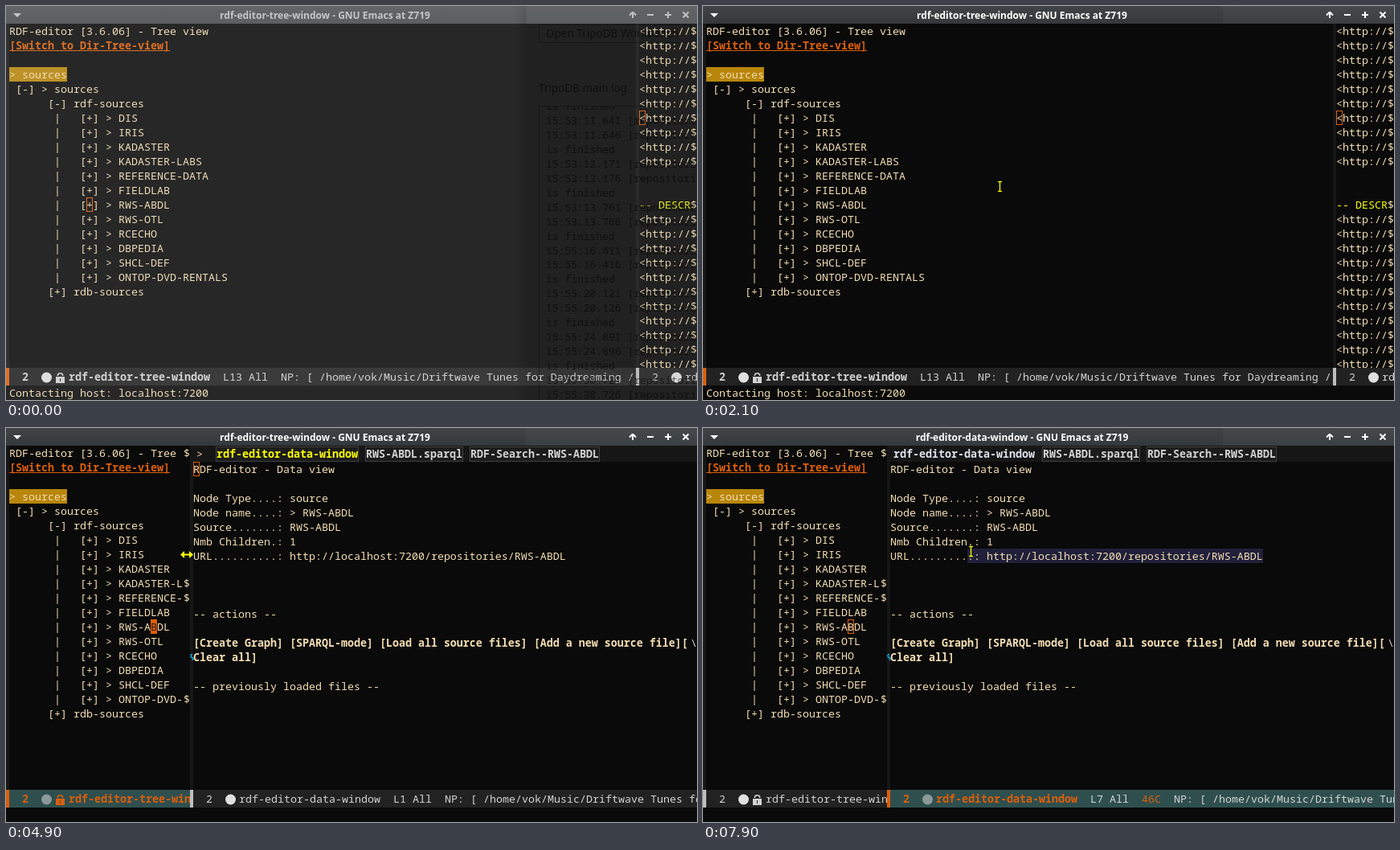
An HTML page with a canvas that plays this animation: 860 by 490 pixels, repeating every 8000 ms.

```html
<!DOCTYPE html>
<html lang="en">
<head>
<meta charset="utf-8">
<title>RDF editor</title>
<style>
html, body { margin: 0; width: 100%; height: 100%; overflow: hidden; background: #0a0a0a; }
canvas { display: block; }
</style>
</head>
<body>
<canvas width="860" height="490"></canvas>
<script>
const W = 860, H = 490, LOOP = 8000, STEP = 100, CW = 8, RH = 18, TOP = 22, MODE_Y = 450;
const BG = '#0a0a0a', FG = '#f5deb3', ORANGE = '#dd5f0a', YELLOW = '#ffff00', GRAY = '#d3d3d3',
      FRINGE = '#161616', TEAL = '#2f4f4f', DIM = '#222222';
const MONO = '13.333px "Noto Sans Mono", monospace';
const CLICK = 1300, LOADED = 3100, SELECT = 6600, URL_ROW = 6;
const c = document.querySelector('canvas').getContext('2d');

const leaves = ['DIS', 'IRIS', 'KADASTER', 'KADASTER-LABS', 'REFERENCE-DATA', 'FIELDLAB', 'RWS-ABDL',
  'RWS-OTL', 'RCECHO', 'DBPEDIA', 'SHCL-DEF', 'ONTOP-DVD-RENTALS'];
const tree = ['RDF-editor [3.6.06] - Tree view', '[Switch to Dir-Tree-view]', '', '> sources',
  ' [-] > sources', '      [-] rdf-sources', ...leaves.map(s => '       |   [+] > ' + s),
  '      [+] rdb-sources'];
const data = ['RDF-editor - Data view', '', 'Node Type....: source', 'Node name....: > RWS-ABDL',
  'Source.......: RWS-ABDL', 'Nmb Children.: 1',
  'URL..........: http://localhost:7200/repositories/RWS-ABDL', '', '', '', '-- actions --', '',
  '[Create Graph] [SPARQL-mode] [Load all source files] [Add a new source file][Clear all]', '',
  '-- previously loaded files --'];
const tabs = ['rdf-editor-data-window', 'RWS-ABDL.sparql', 'RDF-Search--RWS-ABDL'];
const playing = 'NP: [ /home/vok/Music/Driftwave Tunes for Daydreaming /';

// Strokes of movement; a positive power eases in, a negative one eases out
const mouse = { start: [120, 47], moves: [
  { from: 200, to: 800, p: 1, pos: [183, 246] },
  { from: CLICK, to: 2000, p: 1, pos: [235, 235] },
  { from: 2000, to: 2600, p: -1.5, pos: [793, 191] },
  { from: 3200, to: 3500, p: 2.5, pos: [430, 157] },
  { from: 3600, to: 4200, p: -1.5, pos: [279, 157] },
  { from: 4500, to: 4900, p: -1.3, pos: [225, 157] },
  { from: 5500, to: 6000, p: 1.3, pos: [806, 158] },
  { from: 6000, to: 6300, p: -1.3, pos: [702, 157] },
  { from: SELECT, to: 7300, p: -1.25, pos: [333, 153] }] };
const divider = { start: [788], moves: [
  { from: 3200, to: 3500, p: 1.7, pos: [672] },
  { from: 3600, to: 4200, p: -1.7, pos: [287] },
  { from: 4500, to: 4900, p: -1.3, pos: [233] }] };

const ease = (u, p) => p > 0 ? u ** p : 1 - (1 - u) ** -p;

function place(track, t) {
  let pos = track.start;
  for (const m of track.moves) {
    if (t <= m.from) break;
    const k = ease(Math.min(1, (t - m.from) / (m.to - m.from)), m.p);
    pos = pos.map((v, i) => v + (m.pos[i] - v) * k);
  }
  return pos.map(Math.round);
}

function box(x, y, w, h, color) {
  c.fillStyle = color;
  c.fillRect(x, y, w, h);
}

function frame(x, y, w, h, color) {
  c.strokeStyle = color;
  c.lineWidth = 1;
  c.strokeRect(x + .5, y + .5, w - 1, h - 1);
}

// y is the top of an 18 px text row
function text(s, x, y, color = FG, bold = false) {
  c.font = (bold ? 'bold ' : '') + MONO;
  c.fillStyle = color;
  c.fillText(s, x, y + 14);
}

function cut(s, x, end, y, color, bold) {
  const cols = Math.floor((end - x) / CW);
  if (s.length <= cols) return text(s, x, y, color, bold);
  text(s.slice(0, cols - 1), x, y, color, bold);
  text('$', end - CW, y);
}

function clipped(x, y, w, h, draw) {
  c.save();
  c.beginPath();
  c.rect(x, y, w, h);
  c.clip();
  draw();
  c.restore();
}

function triangle(x1, y1, x2, y2, x3, y3) {
  c.beginPath();
  c.moveTo(x1, y1);
  c.lineTo(x2, y2);
  c.lineTo(x3, y3);
  c.fill();
}

// Short stroke centred on x, y
function bar(x, y, dx, dy, width = 2) {
  c.lineWidth = width;
  c.beginPath();
  c.moveTo(x - dx, y - dy);
  c.lineTo(x + dx, y + dy);
  c.stroke();
}

function cursor(x, y, solid, ch) {
  if (!solid) return frame(x, y, CW, RH, ORANGE);
  box(x, y, CW, RH, ORANGE);
  text(ch, x, y, '#33190a');
}

function titleBar(s, focused) {
  const g = c.createLinearGradient(0, 0, 0, TOP);
  g.addColorStop(0, focused ? '#404447' : '#505354');
  g.addColorStop(1, focused ? '#34393c' : '#484b4c');
  box(0, 0, W, TOP, g);
  box(647, 0, W - 647, TOP, 'rgba(255,255,255,.03)');
  c.fillStyle = c.strokeStyle = focused ? '#ffffff' : '#c4c4c4';
  c.font = 'bold 12px "Noto Sans", sans-serif';
  c.textAlign = 'center';
  c.fillText(s + ' - GNU Emacs at Z719', 397, 16);
  c.textAlign = 'left';
  triangle(9, 9, 19, 9, 14, 14);
  bar(780, 11.5, 0, 3.5);
  bar(778, 9.5, 2, -2);
  bar(782, 9.5, 2, 2);
  bar(802, 11, 4, 0);
  bar(824, 11, 4, 0);
  bar(824, 11, 0, 4);
  bar(846, 11, 3.5, 3.5);
  bar(846, 11, 3.5, -3.5);
}

function lock(x, color, hole) {
  box(x, 461, 11, 8, color);
  box(x + 5, 463, 1, 4, hole);
  c.beginPath();
  c.arc(x + 5.5, 460, 3.2, Math.PI, 0);
  c.strokeStyle = color;
  c.lineWidth = 1.6;
  c.stroke();
}

function modeLine(x, end, { name, pos, sel, locked, active, lit }) {
  clipped(x - 4, MODE_Y, end - x + 4, 22, () => {
    const y = MODE_Y + 2, ink = lit ? ORANGE : GRAY, bg = lit ? TEAL : DIM;
    box(x - 4, MODE_Y, end - x + 4, 22, bg);
    box(x - 4, MODE_Y, 4, 22, active ? ORANGE : '#bebebe');
    text('2', x + 16, y, ink, active);
    c.beginPath();
    c.arc(x + 46.5, 462, 6.5, 0, 7);
    c.fillStyle = lit ? '#8c9999' : '#e0e0e0';
    c.fill();
    if (locked) lock(x + 58, ink, bg);
    let at = x + (locked ? 74 : 57);
    const part = (s, color, bold) => {
      if (!s) return;
      text(s, at, y, color, bold);
      at += s.length * CW + 16;
    };
    part(name, ink, active);
    part(pos, GRAY);
    part(sel, ORANGE);
    part(playing, GRAY);
  });
}

// Row and extent of the link under the pointer
function linkAt(t, x, y) {
  const row = Math.floor((y - TOP) / RH), leaf = row > 5 && row < 18;
  if (t < 300 || !leaf && row !== 1) return null;
  const from = leaf ? 124 : 4, to = 4 + tree[row].length * CW;
  return x >= from && x < to && t < 2600 ? { row, from, to } : null;
}

function treeView(t, end, link) {
  clipped(0, TOP, end, MODE_Y - TOP, () => {
    box(0, TOP, 4, MODE_Y, FRINGE);
    box(4, TOP + 3 * RH, 72, RH, '#b8860b');
    if (link) box(link.from, TOP + link.row * RH, link.to - link.from, RH, '#c1ffc1');
    tree.forEach((s, i) => cut(s, 4, end, TOP + i * RH, i === 1 ? ORANGE : FG, i === 1));
    box(4, 55, 200, 1, ORANGE);
    const blink = t >= 2100 && t < 2600 || t >= 5400 && t < 5900;
    if (t < CLICK) cursor(100, 238, false);
    else if (!blink) cursor(180, 238, t < SELECT, 'B');
  });
}

function queryView(x) {
  for (let i = 0; i < 24; i++) {
    if (i === 10 || i === 11) continue;
    const head = i === 12;
    cut(head ? '-- DESCRIBE' : '<http://localhost', x, W, TOP + i * RH, head ? YELLOW : FG);
  }
  cursor(x, TOP + 6 * RH, false);
}

function tabLine(x, active) {
  box(x, TOP, W - x, 20, FRINGE);
  if (!active) text('>', x + 4, 23);
  let at = x + (active ? 4 : 29);
  tabs.forEach((s, i) => {
    const w = s.length * CW;
    if (!active || i) {
      box(at - 1, 23, w + 2, 19, '#1c1c1c');
      frame(at - 1, 23, w + 2, 19, '#404040');
    }
    text(s, at, 23, i ? GRAY : active ? '#dfe3ee' : YELLOW, true);
    at += w + 10;
  });
}

function wrapMark(x, y) {
  c.strokeStyle = '#00bfff';
  c.lineWidth = 1.3;
  c.beginPath();
  c.arc(x - 1, y + 7.5, 2, -Math.PI / 2, Math.PI / 2, true);
  c.arc(x - 1.5, y + 11, 1.5, -Math.PI / 2, Math.PI / 2);
  c.stroke();
}

function dataView(t, x, col) {
  const cols = Math.floor((W - x) / CW), active = t >= SELECT;
  tabLine(x, active);
  let y = 42;
  data.forEach((s, i) => {
    const bold = s[0] === '[', selected = active && i === URL_ROW;
    if (selected) box(x + col * CW, y, (s.length - col) * CW, RH, '#20203a');
    if (cols < 50) cut(s, x, W, y, FG, bold);
    else {
      for (; s.length > cols; s = s.slice(cols - 1), y += RH) {
        text(s.slice(0, cols - 1), x, y, FG, bold);
        text('\\', W - CW, y, GRAY);
        wrapMark(x, y + RH);
      }
      text(s, x, y, FG, bold);
    }
    if (selected && t < 7900) cursor(x + col * CW, y, true, s[col] || ' ');
    y += RH;
  });
  if (!active) cursor(x, 42, false);
}

// Light page showing through the unfocused window
function pageBehind() {
  box(0, 0, 648, H, 'rgba(210,210,210,.14)');
  box(648, 0, W - 648, H, 'rgba(168,168,168,.14)');
  const g = c.createLinearGradient(632, 0, 648, 0);
  g.addColorStop(0, 'rgba(0,0,0,0)');
  g.addColorStop(1, 'rgba(0,0,0,.12)');
  box(632, 0, 16, H, g);
  const ink = 'rgba(0,0,0,.55)', edge = 'rgba(0,0,0,.3)';
  frame(663, 23, 190, 23, edge);
  frame(663, 124, 220, 380, edge);
  c.fillStyle = ink;
  c.font = '13.5px "Noto Sans", sans-serif';
  c.fillText('Open TripoDB Workbench', 672, 39);
  c.fillText('TripoDB main log', 663, 107);
  c.font = '13px "Noto Sans Mono", monospace';
  clipped(663, 125, W - 663, H, () => {
    for (let i = 0; i < 21; i++) {
      const n = Math.floor(i / 3), sec = 11.641 + .53 * n * n + .005 * (i % 3 - 1);
      const s = i % 3 ? `15:${n < 3 ? 53 : 55}:${sec.toFixed(3)} [repositories` : 'is finished';
      c.fillText(s, 672, 129 + i * 17.95);
    }
  });
}

function pointer(t, x, y, hand) {
  if (t < 300) return;
  c.fillStyle = c.strokeStyle = YELLOW;
  if (hand) {
    c.beginPath();
    c.ellipse(x + 7, y + 6, 9, 4.5, .7, 0, 7);
    c.fill();
    c.strokeStyle = '#000';
    c.lineWidth = 1;
    c.stroke();
    for (let i = 0; i < 3; i++) bar(x + 5 + 3 * i, y + 5 + 2 * i, 3, 1, 1);
  } else if (t >= 2600 && t < 5600) {
    bar(x, y + .5, 5, 0);
    for (const d of [-1, 1]) triangle(x + 8 * d, y + .5, x + 3 * d, y - 4, x + 3 * d, y + 5);
  } else {
    bar(x + .5, y + .5, 0, 6, 1.3);
    for (const d of [-6, 6]) bar(x + .5, y + .5 + d, 2.5, 0, 1.3);
  }
}

function draw(t) {
  const [x] = place(divider, t), [mx, my] = place(mouse, t), link = linkAt(t, mx, my);
  const ready = t >= LOADED, right = t >= SELECT, len = data[URL_ROW].length;
  // The text cursor trails the pointer by one step
  const col = Math.min(len, Math.floor((place(mouse, t - STEP)[0] - x) / CW));
  box(0, 0, W, H, BG);
  treeView(t, x - 4, link);
  clipped(x - 4, TOP, W - x + 4, MODE_Y - TOP, () => {
    box(x - 4, TOP, 4, MODE_Y, FRINGE);
    ready ? dataView(t, x, col) : queryView(x);
  });
  modeLine(4, x - 4, { name: 'rdf-editor-tree-window', pos: 'L13 All', locked: true,
    active: !right, lit: ready && !right });
  modeLine(x, W, { name: 'rdf-editor-data-window', pos: right ? 'L7 All' : 'L1 All',
    active: right, lit: right, sel: right && col < len ? len - col + 'C' : '' });
  if (!ready) text('Contacting host: localhost:7200', 4, 472);
  titleBar(`rdf-editor-${right ? 'data' : 'tree'}-window`, t >= CLICK);
  if (t < 1200) pageBehind();
  pointer(t, mx, my, link);
}

const start = performance.now();
function tick(now) {
  const t = Math.max(0, now - start) % LOOP;
  draw(Math.floor(t / STEP) * STEP);
  requestAnimationFrame(tick);
}
draw(0);
requestAnimationFrame(tick);
</script>
</body>
</html>
```
